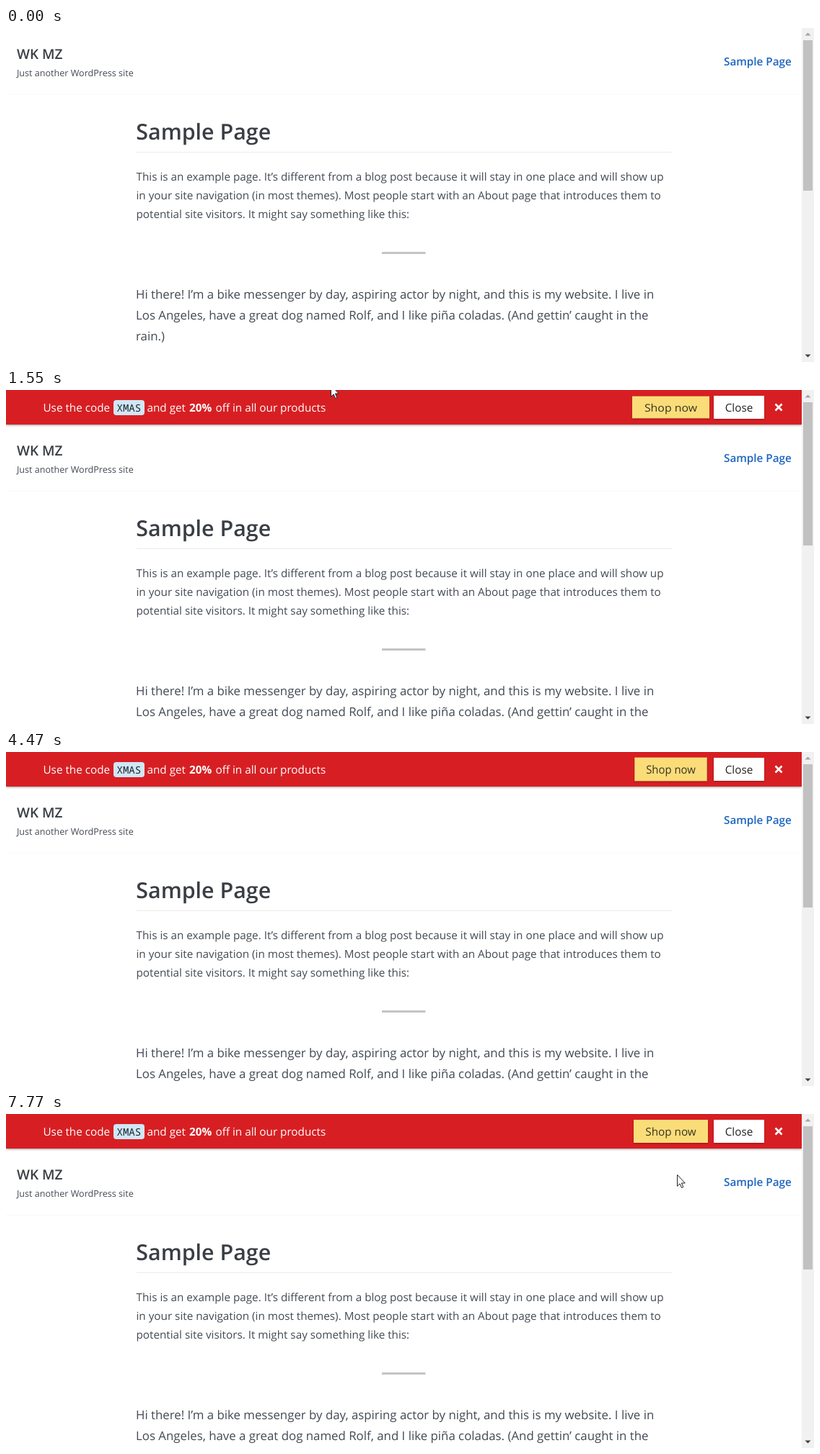
Animation, 1120 px wide and 464 px high, one loop 8000 ms. Source, as an HTML page:

```html
<!DOCTYPE html>
<html lang="en">
<head>
<meta charset="utf-8">
<title>Promo bar</title>
<style>
html, body { margin: 0; width: 100%; height: 100%; overflow: hidden; background: #fff; }
svg { position: fixed; left: 0; top: 0; width: 1120px; height: 464px; display: block; }
text { font-family: "Open Sans", "Noto Sans", sans-serif; font-size: 15.25px; fill: #434a54; white-space: pre; text-rendering: geometricPrecision; }
.semi { font-weight: 600; fill: #3a3e44; }
.nav { font-weight: 600; fill: #1c64c0; }
.small { font-size: 12.58px; }
.big { font-size: 16.84px; }
.bar text { fill: #fff; }
.bar .mono { font: 14px "Noto Sans Mono", "DejaVu Sans Mono", monospace; fill: #1d2730; }
.bar .btn { fill: #3b3323; text-anchor: middle; }
.bar .dark { fill: #222; }
.sheet { filter: drop-shadow(0 1px 1.5px rgba(0, 0, 0, .4)); }
.lift { filter: drop-shadow(0 1px 1.2px rgba(0, 0, 0, .3)); }
</style>
</head>
<body>
<svg viewBox="0 0 1120 464">
  <rect width="1120" height="464" fill="#fff"/>
  <g id="page">
    <text class="semi" x="15" y="43" style="font-size:19px">WK MZ</text>
    <text class="small" x="15" y="67">Just another WordPress site</text>
    <text class="nav" x="995" y="52">Sample Page</text>
    <rect y="92" width="1103" height="1" fill="#fafafa"/>
    <text class="semi" x="180.300" y="155" style="font-size:30.4px">Sample Page</text>
    <rect x="181" y="172" width="742" height="1" fill="#ebebeb"/>
    <text x="180.500" y="212">This is an example page. It’s different from a blog post because it will stay in one place and will show up</text>
    <text x="180.500" y="238">in your site navigation (in most themes). Most people start with an About page that introduces them to</text>
    <text x="180.500" y="264">potential site visitors. It might say something like this:</text>
    <rect x="521" y="311" width="60.500" height="3" fill="#c4c4c4"/>
    <text class="big" x="180" y="376">Hi there! I’m a bike messenger by day, aspiring actor by night, and this is my website. I live in</text>
    <text class="big" x="180" y="405">Los Angeles, have a great dog named Rolf, and I like piña coladas. (And gettin’ caught in the</text>
    <text class="big" x="180" y="434">rain.)</text>
  </g>
  <g id="bar" class="bar">
    <rect class="sheet" width="1103" height="48" fill="#d71f23"/>
    <text x="51.500" y="30">Use the code</text>
    <rect x="149" y="14" width="43" height="21" rx="4" fill="#d0e7f5"/>
    <text class="mono" x="153.500" y="30">XMAS</text>
    <text x="195.500" y="30">and get</text>
    <text x="254" y="30" font-weight="700">20%</text>
    <text x="290.500" y="30">off in all our products</text>
    <g id="shop">
      <rect class="lift" x="870" y="8" width="103" height="32" fill="#fadd79"/>
      <text class="btn" x="921.500" y="30">Shop now</text>
    </g>
    <rect class="lift" x="981" y="8" width="70" height="32" fill="#fff"/>
    <text class="btn dark" x="1016" y="30">Close</text>
    <path d="M1066.500 19.500l9 9m0-9l-9 9" stroke="#fff" stroke-width="2.600"/>
  </g>
  <g>
    <rect x="1103" width="17" height="464" fill="#f1f1f1"/>
    <rect id="thumb" x="1105" y="17" width="13" height="209" fill="#c1c1c1"/>
    <path d="M1107.500 10.500h8l-4-4z" fill="#a3a3a3"/>
    <path d="M1107.500 453.500h8l-4 4z" fill="#404040"/>
  </g>
  <path id="cursor" d="M.5 .5V16.300L4.100 12.900L6.500 18.500L8.800 17.500L6.400 12H11.300Z" fill="#fff" stroke="#22242c"/>
</svg>
<script>
const LOOP = 8000;
const el = id => document.getElementById(id);
const page = el('page'), bar = el('bar'), shop = el('shop'), thumb = el('thumb'), cursor = el('cursor');

// Spans of motion: start, end, number of steps; the picture holds between steps.
const spans = [[490, 1260, 9], [1360, 1930, 7], [2910, 2910, 1], [3820, 4580, 9],
  [4670, 4770, 2], [5560, 6230, 8], [6620, 7390, 9], [7480, 7770, 4]];
// Bar drops in while zooming: progress, scale, vertical shift.
const drop = [[0, .1, -1000], [.6, .475, 60], [1, 1, 0]];
// Rubber-band keys: progress, horizontal scale (vertical is 2 - horizontal).
const band = [[0, 1], [.3, 1.25], [.4, .75], [.5, 1.15], [.65, .95], [.75, 1.05], [1, 1]];
// Pointer path: time, x, y.
const path = [[5560, 598, 75], [5750, 770, 66], [5940, 904, 43], [6030, 910, 38],
  [6230, 914, 31], [7000, 914, 31], [7200, 924, 58], [7390, 929, 79], [7770, 930, 84]];

const clamp = p => Math.min(1, Math.max(0, p));
const ramp = (t, a, b) => clamp((t - a) / (b - a));
const bez = (u, a, b) => 3 * u * (1 - u) ** 2 * a + 3 * u * u * (1 - u) * b + u ** 3;

const cubic = (x1, y1, x2, y2) => x => {
  let lo = 0, hi = 1;
  for (let i = 0; i < 24; i++) {
    const mid = (lo + hi) / 2;
    if (bez(mid, x1, x2) < x) lo = mid; else hi = mid;
  }
  return bez(lo, y1, y2);
};
const ease = cubic(.25, .1, .25, 1);
const fall = cubic(.55, .055, .675, .19);
const settle = cubic(.175, .885, .32, 1);

// The curve gets the progress within a segment and the segment's number.
function along(keys, t, curve = p => p) {
  if (t <= keys[0][0]) return keys[0].slice(1);
  for (let i = 1; i < keys.length; i++) {
    const a = keys[i - 1], b = keys[i];
    if (t <= b[0]) {
      const p = curve((t - a[0]) / (b[0] - a[0]), i);
      return a.slice(1).map((v, k) => v + (b[k + 1] - v) * p);
    }
  }
  return keys[keys.length - 1].slice(1);
}

function held(t) {
  let out = 0;
  for (const [start, end, n] of spans) {
    if (t < start) break;
    const gap = n > 1 ? (end - start) / (n - 1) : 1;
    out = start + gap * Math.min(n - 1, Math.floor((t - start + 4) / gap));
  }
  return out;
}

function place(node, cx, cy, sx, sy, dy = 0) {
  node.setAttribute('transform', `translate(${cx} ${cy}) scale(${sx} ${sy}) translate(${-cx} ${dy - cy})`);
}

function draw(time) {
  const t = held(time);

  const entry = ramp(t, -125, 875);
  const [s, dy] = along(drop, entry, (p, i) => (i === 1 ? fall : settle)(p));
  place(bar, 551.5, 24, s, s, dy);
  bar.setAttribute('opacity', fall(clamp(entry / .6)));

  const pushed = t >= 960;
  page.setAttribute('transform', `translate(0 ${pushed ? 48 : 0})`);
  thumb.setAttribute('height', pushed ? 199 : 209);

  const phase = t < 1002 ? 1 : clamp((t - 1002) % 2800 / 1000);
  const [sx] = along(band, phase, ease);
  place(shop, 921.5, 24, sx, 2 - sx);
  shop.setAttribute('opacity', 1 - .45 * (ramp(t, 5880, 6020) - ramp(t, 7080, 7260)));

  const early = t >= 1150 && t < 2910;
  const [x, y] = early ? [450, -7] : along(path, t);
  cursor.setAttribute('transform', `translate(${x} ${y})`);
  cursor.setAttribute('visibility', early || t >= 5560 ? 'visible' : 'hidden');
}

const begin = performance.now();
function tick() {
  draw((performance.now() - begin) % LOOP);
  requestAnimationFrame(tick);
}
tick();
</script>
</body>
</html>
```
